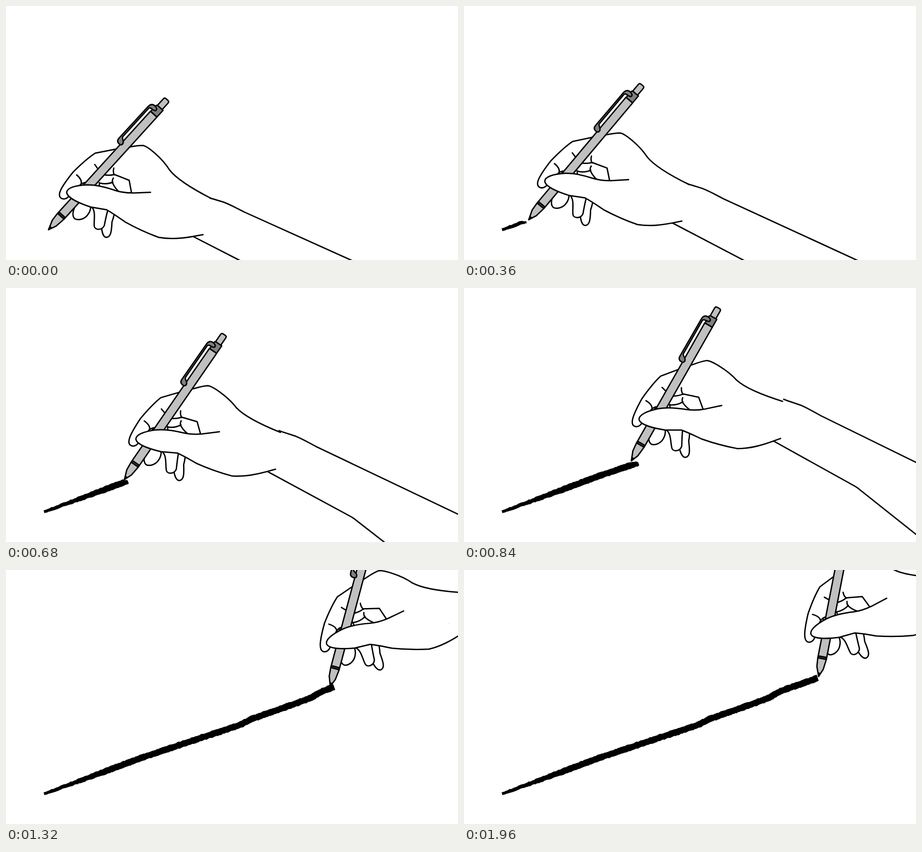
Write an HTML page that moves like this. It is 998 px wide and 561 px high and loops after 2200 ms.

```html
<!DOCTYPE html>
<html lang="en">
<head>
<meta charset="utf-8">
<title>Hand drawing a line</title>
<style>
html, body { margin: 0; width: 100%; height: 100%; overflow: hidden; background: #fff; }
svg { display: block; width: 998px; height: 561px; }
g { fill: #fff; stroke: #000; stroke-width: 3; stroke-linecap: round; stroke-linejoin: round; }
.line { fill: none; }
.light { fill: #c0c0c0; }
.dark { fill: #808080; }
</style>
</head>
<body>
<svg viewBox="0 0 998 561">
  <path id="ink"/>
  <g id="arm" class="line">
    <path d="M443 421.5L450 424L480 433C496 439 510 447 526 455L868 609"/>
    <path d="M400 503L415 510L606 608Q612 611 618 616L800 751"/>
  </g>
  <g class="hand">
    <!-- lower fingers -->
    <path d="M211 489C212 499 214 511 222 511C231 510 233 500 234 477C237 467 239 465 239 456"/>
    <path d="M188 443C200 452 193 475 195 487C197 495 212 496 217 485C220 470 222 460 225 450"/>
    <path d="M152 444C147 454 146 465 152 470C160 474 172 471 179 463C185 456 187 450 187 443"/>
    <!-- index finger and back of the hand -->
    <path d="M139 420C133 427 125 428 120 423C114 416 120 402 148 367C165 350 180 336 197 325L243 316L275 311C290 308 298 308 302 308C312 309 345 336 361 362C375 380 410 403 453 425"/>
    <g class="line">
      <path d="M196 350L203 360M156 373C163 379 168 386 166 393M161 398C165 392 170 390 178 390M171 397L174 390"/>
      <path d="M238 358C236 365 237 369 239 373M217 373Q230 375 239 372L272 385L277 412"/>
      <path d="M207 391Q222 395 236 389M206 398V390M237 380C234 385 234 390 237 394C240 401 245 406 250 411"/>
    </g>
  </g>
  <g id="pen">
    <path class="light" d="M0 0L21 -8L40 -9.6H345V9.6H40L17 7Z"/>
    <path d="M0 0L7 -2V2Z" fill="#000"/>
    <path d="M40 -9V9H44.5V-9Z" fill="#444"/>
    <path class="light" d="M364 -7H384Q388.5 -7 388.5 -3V3Q388.5 7 384 7H364Z"/>
    <path class="dark" d="M345 -9H361Q365 -9 365 -5V9.5H345Z"/>
    <path class="dark" d="M348 -17H262C258 -16 257 -10 254 -8C250 -5 245 -6 245 -12C245 -18 248 -21 254 -21L350 -20.5C357 -20 361 -16 360 -10C360 -4 357 -1 354 -2C351 -3 352 -6 351 -8C351 -12 350 -16 348 -17Z"/>
  </g>
  <g class="hand">
    <!-- thumb and heel of the hand -->
    <path d="M319 411.5L281 413C262 413 252 411 240 407C220 400 200 395 180 395C152 396 134 402 134 412C135 423 160 435 187 444L222 450C238 459 250 468 263 477C290 492 315 503 337 511C365 516 390 513 413 509L435 505"/>
  </g>
</svg>
<script>
// Share of the whole movement done at some times
const pace = [[0, 0], [200, .031], [520, .134], [840, .407], [1120, .778], [1320, .91], [1640, .985], [1960, 1]];
// Middle of the ink line: straight runs with two small steps
const spine = [[84, 494.5], [310, 411], [520, 341], [540, 330], [670, 284], [700, 267], [783, 238]];

const clamp = v => Math.max(0, Math.min(1, v));
const noise = n => { const v = Math.sin(n * 12.9898) * 43758.5453; return v - Math.floor(v) - .5; };
const slope = (list, i) => (list[i + 1][1] - list[i][1]) / (list[i + 1][0] - list[i][0]);

function segment(list, x) {
  let i = 0;
  while (i < list.length - 2 && x >= list[i + 1][0]) i++;
  return i;
}

function linear(list, x) {
  const i = segment(list, x);
  return list[i][1] + slope(list, i) * (x - list[i][0]);
}

// Monotone cubic through the points, at rest at both ends
function smooth(list, x) {
  const i = segment(list, x), [x0, y0] = list[i], [x1, y1] = list[i + 1];
  const span = x1 - x0, s = (x - x0) / span;
  const tangent = k => {
    if (k < 1 || k > list.length - 2) return 0;
    const a = slope(list, k - 1), b = slope(list, k);
    return 2 * a * b / (a + b);
  };
  return y0 + (y1 - y0) * s * s * (3 - 2 * s)
    + span * s * (1 - s) * ((1 - s) * tangent(i) - s * tangent(i + 1));
}

function inkPath(head) {
  if (head < 85) return '';
  const top = [], bottom = [], bend = clamp((600 - head) / 200);
  const add = x => {
    const droop = bend * clamp(1 - (head - x) / 18) ** 2;
    const y = linear(spine, x) + 4 * droop;
    const half = (3 + 3.8 * clamp((x - 84) / 150)) * (1 - .65 * droop);
    const rough = x < 100 ? .8 : 1.8;
    top.push([x - half * .33, y - half + rough * noise(x)]);
    bottom.unshift([x + half * .33, y + half + rough * noise(x + 999)]);
  };
  for (let x = 84; x < head - 3; x += 3) add(x);
  add(head - 2);
  return 'M' + [...top, ...bottom].map(p => p.map(v => v.toFixed(1))).join('L') + 'Z';
}

const ink = document.getElementById('ink'), arm = document.getElementById('arm');
const pen = document.getElementById('pen'), hands = document.querySelectorAll('.hand');

function draw() {
  const t = Math.min(1960, Math.floor(performance.now() % 2200 / 40) * 40);
  const p = smooth(pace, t), rest = 1 - p, arc = p * rest;
  const turn = 25.6 * p - 15.4 * p * rest ** 4;
  const slip = 31.3 * p - 22 * p ** 6 * rest - turn;
  const sag = 3.9 * p ** .8;

  // The hand follows a shallow arc; wrist and pen pivot within it
  const hold = `translate(${614 * p} ${-349 * p - 41 * arc}) rotate(${-turn} 319 411)`;
  hands.forEach(h => h.setAttribute('transform', hold));
  arm.setAttribute('transform', `${hold} rotate(${turn + sag} 453 487)`);
  pen.setAttribute('transform', `${hold} rotate(${-slip} 184 348) translate(94 494) rotate(-47.7)`);
  ink.setAttribute('d', inkPath(84 + 699 * p + 80 * arc));
  requestAnimationFrame(draw);
}
draw();
</script>
</body>
</html>
```
